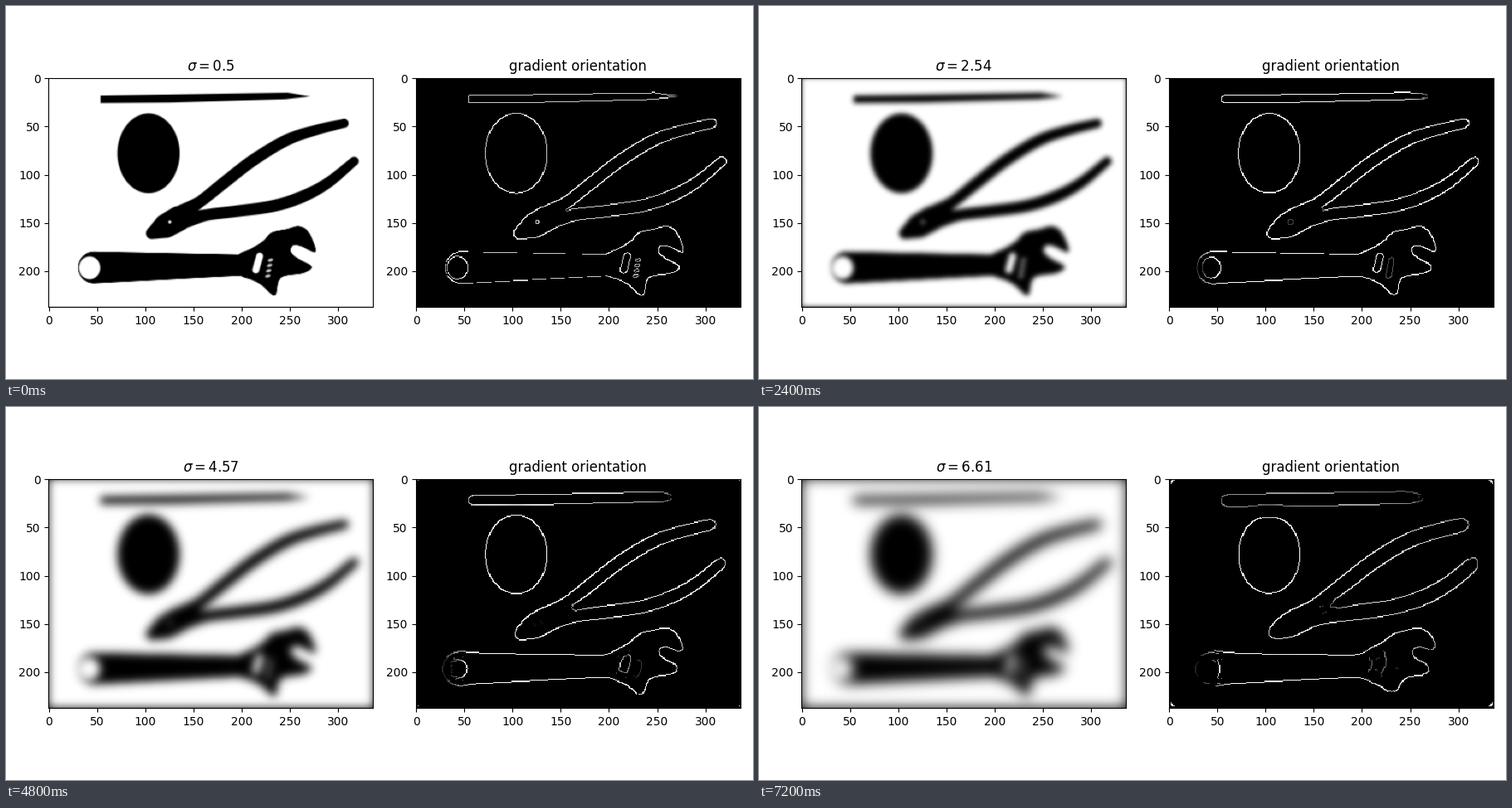
Animation of 900 by 450 pixels, one loop 8 s. Source, as a matplotlib script:

```python
import numpy as np
import matplotlib.pyplot as plt
from matplotlib.animation import FuncAnimation
from matplotlib.path import Path

W, H = 337, 238
SIGMAS = np.linspace(0.5, 10, 15)[:10]
Y, X = np.mgrid[:H, :W].astype(float)


def place(points):
    """Stage pixels in the right panel to image coordinates."""
    return (np.asarray(points, float) - (494.3, 87.1)) / 1.1596


def smooth(points, steps=5, closed=True):
    """Catmull-Rom curve through the points."""
    p = np.asarray(points, float)
    if closed:
        p = np.vstack([p[-1], p, p[:2]])
    else:
        p = np.vstack([2 * p[0] - p[1], p, 2 * p[-1] - p[-2]])
    a, b, c, d = p[:-3], p[1:-2], p[2:-1], p[3:]
    t = (np.arange(steps) / steps)[:, None, None]
    curve = 0.5 * (2 * b + (c - a) * t + (2 * a - 5 * b + 4 * c - d) * t ** 2
                   + (3 * b - a - 3 * c + d) * t ** 3)
    curve = curve.transpose(1, 0, 2).reshape(-1, 2)
    return curve if closed else np.vstack([curve, p[-2]])


# Shapes are signed depths in image pixels, positive inside.

def ellipse(cx, cy, rx, ry, slant=0.0):
    dy = Y - cy
    dx = X - cx + slant * dy
    rho = np.hypot(dx / rx, dy / ry) + 1e-9
    slope = np.hypot(dx / rx ** 2, dy / ry ** 2) + 1e-9
    return (1 - rho) * rho / slope


def polygon(points):
    grid = np.column_stack([X.ravel(), Y.ravel()])
    inside = Path(np.vstack([points, points[:1]])).contains_points(grid)
    dist = np.full((H, W), np.inf)
    for (x0, y0), (x1, y1) in zip(points, np.roll(points, -1, 0)):
        ex, ey = x1 - x0, y1 - y0
        t = ((X - x0) * ex + (Y - y0) * ey) / (ex * ex + ey * ey + 1e-12)
        t = np.clip(t, 0, 1)
        dist = np.minimum(dist, np.hypot(X - x0 - t * ex, Y - y0 - t * ey))
    return np.where(inside.reshape(H, W), dist, -dist)


def sweep(points, radii, count=160):
    """Round brush along a smooth path; radii are spread evenly over it."""
    path = smooth(place(points), 20, closed=False)
    s = np.linspace(0, 1, count)
    u = np.linspace(0, 1, len(path))
    r = np.interp(s, np.linspace(0, 1, len(radii)), radii)
    depth = np.full((H, W), -np.inf)
    for x, y, k in zip(np.interp(s, u, path[:, 0]), np.interp(s, u, path[:, 1]), r):
        depth = np.maximum(depth, k - np.hypot(X - x, Y - y))
    return depth


def cover(depth, width=1.0):
    return np.clip(depth / width + 0.5, 0, 1)


def draw_tools():
    pencil = polygon(place([(556.5, 108.5), (640, 107.3), (781, 105), (808, 109.5),
                            (778, 113), (640, 116.9), (556.5, 117.5)]))
    egg = ellipse(103.3, 78.3, 32.2, 41.3)

    jaw = sweep([(618, 274), (635, 265), (650, 256.5)], [6, 12.5, 13])
    upper = sweep([(654, 249), (676, 236), (705, 213), (740, 186), (780, 162),
                   (815, 150), (849, 141.8)], [8, 6, 6.2, 6.2, 6, 5.4, 4.7])
    lower = sweep([(654, 260), (684, 252), (720, 247.5), (765, 241), (800, 229.5),
                   (830, 213), (861, 187.5)], [8, 6, 6, 6.2, 6.2, 5.6, 4.7])
    rivet = ellipse(125.3, 149.5, 1.6, 1.6)
    soft = cover(np.max([pencil, egg, jaw, upper, lower], 0)) * (1 - cover(rivet))

    shaft = sweep([(548.5, 315.2), (725, 312.3)], [16.5, 11])
    head = polygon(smooth(place(
        [(715, 312), (722, 299.6), (738, 292), (752, 283), (762, 273), (780, 269),
         (795, 265.5), (807, 273.5), (815, 296.5), (798, 290), (788, 288.5),
         (785, 296), (793, 304), (810, 314), (800, 322), (773, 327.5),
         (766, 349), (750, 336.5), (738, 330), (725, 325.2)])))
    wrench = cover(np.maximum(shaft, head), 0.6)
    eye = ellipse(42.3, 197, 11, 11.8)
    slot = sweep([(747.5, 301.5), (743, 318)], [3.6, 3.6])
    wrench *= 1 - cover(np.maximum(eye, slot))
    for k in range(4):
        groove = ellipse(229.6 - 0.9 * k, 189 + 5.5 * k, 2.6, 1.7, 0.5)
        wrench *= 1 - 0.75 * cover(groove)
    return 1 - np.maximum(soft, wrench)


def blur(img, sigma):
    r = int(np.ceil(3 * sigma))
    k = np.exp(-np.arange(-r, r + 1) ** 2 / (2 * sigma ** 2))
    k /= k.sum()
    for axis in (0, 1):
        img = np.apply_along_axis(np.convolve, axis, img, k, mode="same")
    return img


def thin_edges(img):
    """Gradient magnitude, kept only at maxima across the edge."""
    p = np.pad(img, 1)
    gx = (p[1:-1, 2:] - p[1:-1, :-2]) / 2
    gy = (p[2:, 1:-1] - p[:-2, 1:-1]) / 2
    mag = np.hypot(gx, gy)
    sector = np.round(np.arctan2(gy, gx) / (np.pi / 4)).astype(int) % 4
    out = np.zeros_like(mag)
    core = mag[1:-1, 1:-1]
    for s, (dx, dy) in enumerate([(1, 0), (1, 1), (0, 1), (-1, 1)]):
        ahead = mag[1 + dy:H - 1 + dy, 1 + dx:W - 1 + dx]
        behind = mag[1 - dy:H - 1 - dy, 1 - dx:W - 1 - dx]
        peak = core > np.maximum(ahead, behind) + 1e-7
        keep = peak & (sector[1:-1, 1:-1] == s)
        out[1:-1, 1:-1][keep] = core[keep]
    return out


tools = draw_tools()
blurred = [blur(tools, s) for s in SIGMAS]
edges = [thin_edges(b) for b in blurred]

fig, (left, right) = plt.subplots(1, 2, figsize=(9, 4.5), dpi=100)
soft_view = left.imshow(blurred[0], cmap="gray")
edge_view = right.imshow(edges[0], cmap="gray", interpolation="nearest")
title = left.set_title(r"$\sigma = 0.5$")
right.set_title("gradient orientation")
fig.tight_layout(w_pad=1.085)


def update(i):
    for view, data in ((soft_view, blurred[i]), (edge_view, edges[i])):
        view.set_data(data)
        view.autoscale()
    title.set_text(rf"$\sigma = {round(SIGMAS[i], 2)}$")
    return soft_view, edge_view, title


anim = FuncAnimation(fig, update, frames=len(SIGMAS), interval=800, repeat=True)
plt.show()
```
